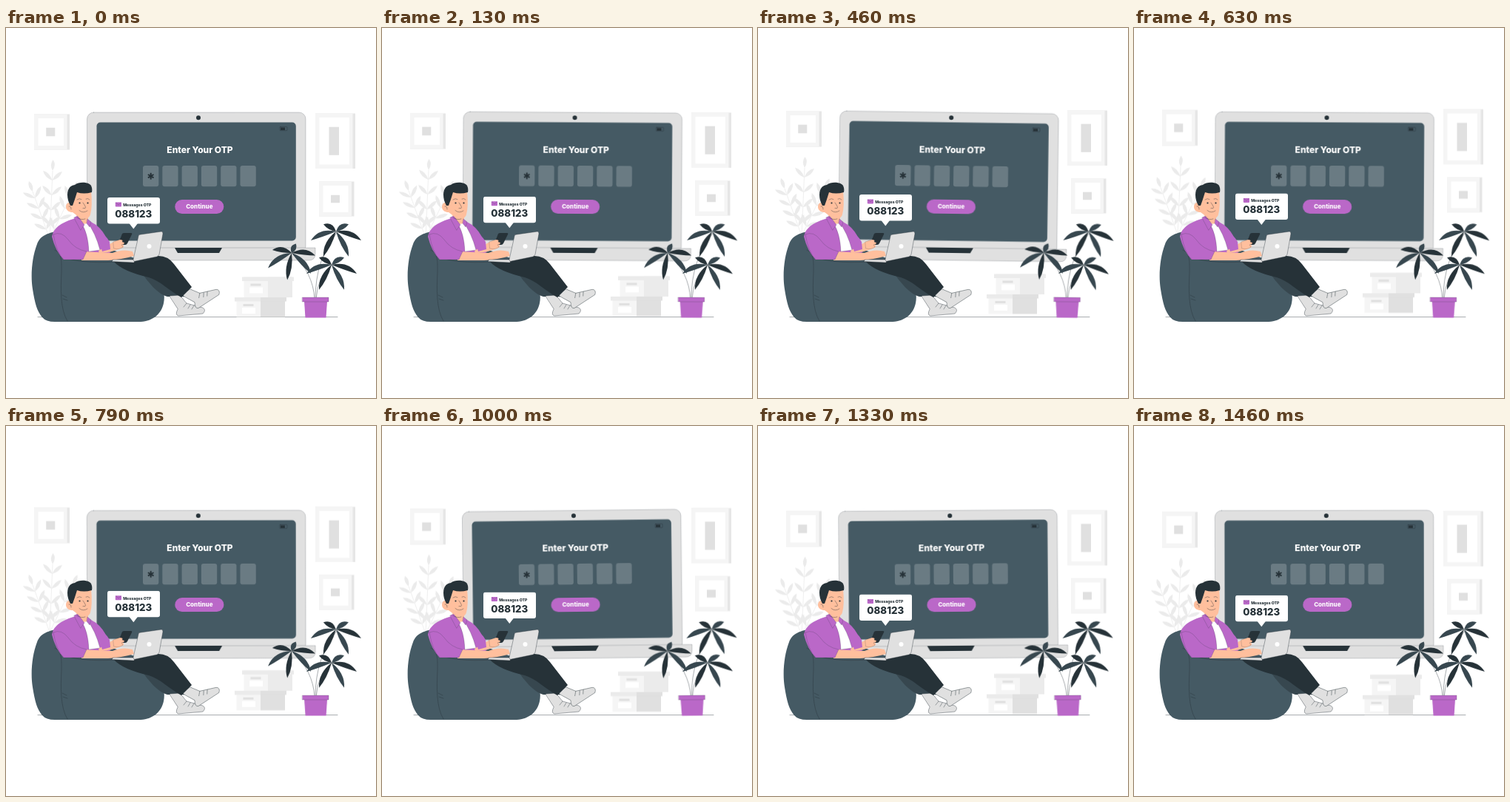
An HTML page that plays this animation: 500x500 px, repeating every 1500 ms.

```html
<!DOCTYPE html>
<html lang="en">
<head>
<meta charset="utf-8">
<title>Enter Your OTP</title>
<style>
  html, body { margin: 0; width: 100%; height: 100%; overflow: hidden; background: #fff; }
  svg { display: block; width: 100%; height: 100%; }
  text { font-family: Inter, "Open Sans", sans-serif; font-weight: 800; }
  .mid { text-anchor: middle; }
  .float { animation: float 1.5s linear infinite; }
  .sway { animation: sway 1.5s linear infinite; transform-box: view-box; }
  #monitor { transform-origin: 263px 214px; }
  #plant { transform-origin: 417px 327px; }
  .ink { fill: none; }
  .ink, .edge { stroke: #263238; stroke-width: .4; stroke-linecap: round; stroke-linejoin: round; }
  .hair { stroke-width: .2; }
  .dark { fill: #263238; }
  .slate { fill: #455a64; }
  .purple { fill: #ba68c8; }
  .skin { fill: #ffbf9d; }
  .grey { fill: #e0e0e0; }
  .white { fill: #fff; }
  @keyframes float { 50% { transform: translateY(-6.67px); } }
  @keyframes sway { 25% { transform: rotate(1deg); } 75% { transform: rotate(-1deg); } }
</style>
</head>
<body>
<svg viewBox="0 0 500 500">
  <defs>
    <path id="shoe" class="grey edge" d="M-7 0L7-1L16 10L38 16Q43 19 38 24L5 27Q0 26 4 18ZM16 10L12 15M21 12L18 17M26 13L23 18"/>
  </defs>
  <path class="ink" d="M43 390.5H448"/>

  <g class="float">
    <g id="frames"></g>
    <g id="fern" fill="#ebebeb" stroke="#ebebeb" stroke-width=".8"></g>
    <g id="boxes"></g>
  </g>

  <g id="monitor" class="sway">
    <rect class="grey edge hair" x="109.500" y="114" width="295.500" height="190" rx="9"/>
    <path class="grey edge hair" d="M112 297H418V305Q418 314 409 314H121Q112 314 112 305Z"/>
    <path class="dark" d="M228 297H292L288 304H232Z"/>
    <rect class="slate" x="122.500" y="127.500" width="269.300" height="160" rx="5"/>
    <circle class="dark" cx="260" cy="121.300" r="3"/>
    <rect class="ink" x="370" y="133.500" width="10" height="5.200" rx="1"/>
    <path class="dark" d="M371 134.500H377V138H371Z"/>
    <text class="white mid" x="262" y="168.700" font-size="12">Enter Your OTP</text>
    <g id="cells" fill="#fff" fill-opacity=".2"></g>
    <g id="star" stroke="#263238" stroke-width="2" transform="translate(195.700 200.200)"></g>
    <rect class="purple" x="228.300" y="232" width="66" height="19" rx="9.500"/>
    <text class="white mid" x="261.300" y="243.700" font-size="8">Continue</text>
  </g>

  <!-- bean bag -->
  <path class="slate" d="M76 274C56 276 46 281 42 292C35 310 33 335 36 353C39 372 42 383 49 391Q54 397 66 397H182C199 396 210 386 213 372Q216 357 208 345L184 315Z"/>
  <path class="ink" d="M66 300C76 304 75 316 75 330C74 352 73 380 83 396M76 309Q100 319 148 316M76 361L82 364M77 366L83 368"/>

  <!-- legs and shoes -->
  <path fill="#37474f" d="M178 322C191 344 206 360 218 363H244L232 340Z"/>
  <use href="#shoe" transform="translate(228 362)"/>
  <use href="#shoe" transform="translate(243 357) rotate(-28)"/>
  <path class="dark" d="M146 316L206 308Q219 308 227 319L251 350L237 364C219 354 209 342 193 337Q158 329 146 316Z"/>

  <!-- torso and far arm -->
  <path class="purple" d="M94 257C77 262 64 269 62 282Q67 302 78 313H130L142 302Q134 268 110 260Z"/>
  <path class="white edge hair" d="M102 264L109 261Q121 277 127 300L112 302Q111 277 102 264Z"/>
  <path class="skin" d="M94 246L111 250V263Q104 268 96 258Z"/>
  <path class="purple edge hair" d="M92 256L97 254L106 266L101 273ZM110 258L115 262L113 269L109 264Z"/>
  <path class="skin" d="M125 301L142 291Q152 285 158 289L159 296Q146 303 126 304Z"/>
  <path class="purple" d="M122 273Q135 279 140 289L141 299L130 302Z"/>
  <path class="dark" d="M157 278Q158 277 160 277H169Q171 277 170 279L164 291Q163 293 161 293H153Q151 293 152 291Z"/>
  <path class="skin edge hair" d="M145 289L154 286Q159 286 157 289L160 290Q160 293 156 293L158 296Q153 300 146 298Z"/>

  <!-- near arm -->
  <path class="skin" d="M103 302L144 304Q158 298 171 302L173 308Q156 313 138 314H102Z"/>
  <path class="purple edge hair" d="M64 279Q75 274 84 286Q93 299 109 302L104 313H78Q68 303 64 279Z"/>

  <!-- laptop -->
  <path class="grey edge" d="M145 313H174L173 317L143 315.500Z"/>
  <path class="grey edge" d="M179 281Q179 279 182 279L210 275Q212 275 212 278L207 306Q206 308 204 309L175 315Q172 316 172 313Z"/>
  <circle class="white" cx="193.500" cy="295" r="3"/>

  <!-- head -->
  <path class="skin" d="M91 220H115Q117 241 114 252C112 259 104 259 98 255L90 249C80 249 79 239 84 236L91 238Z"/>
  <path class="dark" d="M87 240C83 233 82 225 84 219Q86 213 93 212C99 207 112 208 115 213Q117 217 116 222Q105 225 96 222Q93 232 90 240Z"/>
  <path class="ink" d="M104 236Q109 243 107 243.500H104M99 246.500Q104 251 110 247M85 241Q88 240 88 245M96 256Q101 260 107 258M96 232Q99 229.500 102 231.500M108 231Q111 229.500 113 232"/>
  <circle class="dark" cx="99.500" cy="236.500" r="1.100"/>
  <circle class="dark" cx="110.500" cy="236.500" r="1.100"/>

  <!-- message bubble -->
  <g class="float">
    <rect class="white" x="137" y="229" width="71" height="35.500" rx="3"/>
    <path class="white" d="M166.500 264H178L172.300 271.500Z"/>
    <rect class="purple" x="147.800" y="235.500" width="8.200" height="6" rx=".8"/>
    <path class="ink hair" d="M148.300 236L152 239L155.500 236"/>
    <text class="dark" x="158.200" y="241" font-size="5.200">Messages OTP</text>
    <text class="dark mid" x="172.300" y="256" font-size="13.300">088123</text>
  </g>

  <g id="plant" class="sway">
    <path class="ink" d="M417 366Q415 330 386 304M418 366Q418 313 447 277M419 366Q421 335 441 320"/>
    <g id="leaves"></g>
    <path class="purple" d="M403 369H434L432.500 391.500H404.500Z"/>
    <path class="purple edge hair" d="M400.500 364H436V370H400.500Z"/>
  </g>
</svg>
<script>
  const NS = 'http://www.w3.org/2000/svg';
  const add = (id, tag, attrs) => {
    const el = document.createElementNS(NS, tag);
    for (const key in attrs) el.setAttribute(key, attrs[key]);
    document.getElementById(id).append(el);
  };
  const box = (id, x, y, width, height, fill) => add(id, 'rect', { x, y, width, height, fill });

  // Blade from (x, y) to (x + dx, y + dy), w wide on each side, bowed by bend
  const leaf = (id, x, y, dx, dy, w, bend, attrs) => {
    const len = Math.hypot(dx, dy);
    const side = k => `${x + dx * .55 - dy / len * k} ${y + dy * .55 + dx / len * k}`;
    const tip = `${x + dx} ${y + dy}`;
    add(id, 'path', { d: `M${x} ${y}Q${side(bend + w)} ${tip}Q${side(bend - w)} ${x} ${y}Z`, ...attrs });
  };

  const frame = (x, y, w, h) => {
    const face = w - 3.5, pw = w / 4, ph = h - 36.5;
    box('frames', x, y, w, h, '#e6e6e6');
    box('frames', x, y, face, h, '#f5f5f5');
    box('frames', x + 5.5, y + 5.5, face - 10, h - 11, '#fff');
    box('frames', x + (face - pw) / 2, y + (h - ph) / 2, pw, ph, '#e0e0e0');
  };
  frame(38, 116.5, 48, 48);
  frame(418, 115.5, 54, 74.5);
  frame(423, 207.5, 47.5, 47);

  // Storage box: lid, front with label, shaded side
  const crate = (x, y, h, shade) => {
    box('boxes', x + 2.5, y, 32.5, h, '#f5f5f5');
    box('boxes', x, y, 35, 5.5, '#ebebeb');
    box('boxes', x + 35, y, 33, h, shade);
    box('boxes', x + 35, y, 35, 5.5, shade);
    box('boxes', x + 10, y + 14, 18, 8, '#fff');
    box('boxes', x + 11.5, y + 9, 14, 3, '#e0e0e0');
  };
  crate(319, 336.5, 27.5, '#ebebeb');
  crate(309, 364, 26.5, '#e0e0e0');

  for (let i = 0; i < 6; i++)
    add('cells', 'rect', { x: 185 + i * 26.3, y: 186, width: 21.3, height: 28.3, rx: 3 });
  for (let i = 0; i < 3; i++)
    add('star', 'path', { d: 'M0-4.400V4.400', transform: `rotate(${i * 60})` });

  // Pale plant: three fanned stems with leaf pairs
  for (let s = -1; s <= 1; s++) {
    const x = 59, y = 285, dx = 4 + s * 27, dy = Math.abs(s) * 28 - 92;
    const angle = Math.atan2(dy, dx);
    const at = (k, turn, len) => leaf('fern', x + dx * k, y + dy * k,
      len * Math.cos(angle + turn), len * Math.sin(angle + turn), 5, 0, { stroke: 'none' });
    add('fern', 'path', { d: `M${x} ${y}l${dx} ${dy}` });
    at(1, 0, 15);
    for (let k = .2; k < 1; k += .22) {
      at(k, -.8, 18);
      at(k, .8, 18);
    }
  }

  // Dark plant: six drooping leaves round each crown
  const crown = (x, y, turn) => {
    for (let i = 0; i < 6; i++) {
      const a = turn + i * Math.PI / 3;
      leaf('leaves', x, y, 34 * Math.cos(a), 12 + 25 * Math.sin(a), 7, -6 * Math.cos(a),
        { fill: i % 2 ? '#37474f' : '#263238' });
    }
  };
  crown(386, 304, -.35);
  crown(446, 275, 0);
  crown(440, 320, 0);
</script>
</body>
</html>
```
